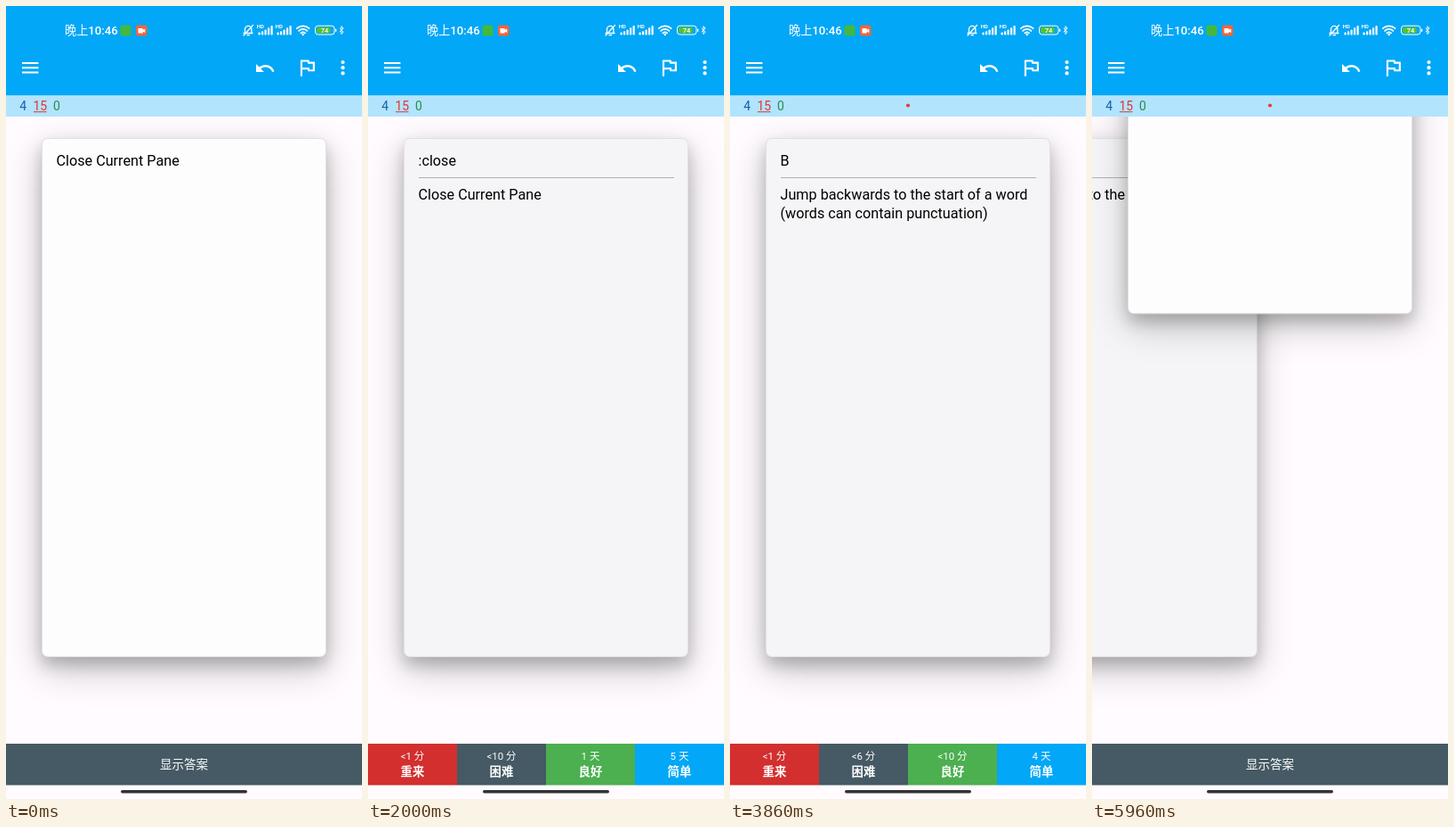
An HTML page for the animation above (6030 ms loop, 400 by 889 pixels).

```html
<!DOCTYPE html>
<html lang="zh-CN">
<head>
<meta charset="utf-8">
<title>Flashcards</title>
<style>
html, body { margin: 0; width: 100%; height: 100%; overflow: hidden; background: #fffbfe; }
#stage { position: absolute; left: 0; top: 0; width: 400px; height: 889px; overflow: hidden; background: #fffbfe; }
#deck { position: absolute; left: 0; top: 124px; width: 400px; height: 703px; overflow: hidden; }
.face {
  position: absolute; left: 40px; top: 24px; width: 320px; height: 582px;
  box-sizing: border-box; border: 1px solid #e1dfe2; border-radius: 7px;
  background: #fefdfe; box-shadow: 0 14px 42px rgba(0,0,0,.22), 0 9px 17px rgba(0,0,0,.2);
  font: 16.2px/20.5px Roboto, "Noto Sans", sans-serif; color: #000; visibility: hidden;
}
.back { background: #f5f4f6; }
.face p { position: absolute; margin: 0; left: 15.5px; top: 15.2px; white-space: pre; }
.back p + hr + p { top: 53.3px; }
.face hr { position: absolute; margin: 0; left: 16px; top: 43px; width: 287px; height: 1.4px; border: 0; background: #b2b1b3; }
svg { position: absolute; left: 0; top: 0; }
text { font-family: Roboto, "Noto Sans CJK SC", "Noto Sans CJK", sans-serif; }
</style>
</head>
<body>
<div id="stage">
  <div id="deck"></div>
  <svg width="400" height="889" viewBox="0 0 400 889">
    <rect width="400" height="100.5" fill="#02a7f7"/>
    <rect y="100.5" width="400" height="23.5" fill="#b2e4fd"/>

    <!-- status bar -->
    <text x="66" y="32" font-size="13.2" font-weight="500" fill="#fff">晚上10:46</text>
    <rect x="128.5" y="21.5" width="12" height="12" rx="2.5" fill="#43b93c"/>
    <rect x="146" y="21.5" width="12.500" height="12" rx="2.5" fill="#f2653a"/>
    <path d="M148.500 25h5.200v1.700l2.600-1.300v4.700l-2.600-1.300v1.700h-5.200z" fill="#fff"/>
    <g fill="none" stroke="#fff" stroke-width="1.3" stroke-linecap="round" stroke-linejoin="round">
      <path d="M267 30.500h10M268.500 30v-4a3.700 3.700 0 0 1 7.400 0v4M271 32.700h2.500M277.500 21.500l-10.500 11.500"/>
      <path d="M326.800 25.200a10 10 0 0 1 13.800 0M329 27.900a6.700 6.700 0 0 1 9.400 0M331.300 30.400a3.500 3.500 0 0 1 4.800 0" stroke-width="1.7"/>
      <path d="M375 25.200l4 4-2.100 2.300v-8.800l2.100 2.300-4 4" stroke-width="1"/>
    </g>
    <circle cx="333.700" cy="32" r="1.200" fill="#fff"/>
    <g id="signals" fill="#fff"></g>
    <rect x="347.500" y="22.200" width="21.500" height="9.800" rx="3" fill="none" stroke="#fff"/>
    <rect x="349" y="23.700" width="15.500" height="6.800" rx="1.700" fill="#55c232"/>
    <rect x="370" y="25.500" width="1.300" height="3.300" rx=".6" fill="#fff"/>
    <text x="358" y="29.900" font-size="7.500" font-weight="500" text-anchor="middle" fill="#fff">74</text>

    <!-- tool bar -->
    <path d="M18 64h18.500M18 69.200h18.500M18 74.400h18.500" stroke="#fff" stroke-width="2"/>
    <path transform="translate(279 58)" fill="#fff" d="M12.500 8c-2.650 0-5.050.99-6.900 2.600L2 7v9h9l-3.620-3.620c1.390-1.160 3.160-1.880 5.120-1.880 3.540 0 6.550 2.310 7.600 5.500l2.370-.78C21.080 11.030 17.150 8 12.500 8z"/>
    <path transform="translate(325.500 56.200) scale(1.07)" fill="#fff" d="M12.360 6l.4 2H18v6h-3.360l-.4-2H7V6h5.360M14 4H5v17h2v-7h5.600l.4 2h7V6h-5.600L14 4z"/>
    <g fill="#fff"><circle cx="378.500" cy="63" r="2.100"/><circle cx="378.500" cy="69.200" r="2.100"/><circle cx="378.500" cy="75.400" r="2.100"/></g>

    <!-- counts -->
    <g font-size="14">
      <text x="15.300" y="117" fill="#1260a8">4</text>
      <text x="30.500" y="117" fill="#e0362f">15</text>
      <text x="53" y="117" fill="#2c8c50">0</text>
    </g>
    <rect x="31" y="118.200" width="14.500" height="1" fill="#e0362f"/>
    <circle id="dot" cx="200" cy="111.500" r="2.100" fill="#f03a35"/>

    <!-- bottom -->
    <g id="show">
      <rect y="827" width="400" height="46.500" fill="#455a64"/>
      <text x="200" y="855" font-size="13.500" font-weight="500" text-anchor="middle" fill="#fff">显示答案</text>
    </g>
    <g id="grades" text-anchor="middle" fill="#fff"></g>
    <rect x="129" y="879" width="142" height="3.500" rx="1.750" fill="#333"/>
  </svg>
</div>
<script>
const LOOP = 6030, LAST = 5960, MOVE = 800, LEAD = 40;
const DEPTH = 1018, EXIT = 390, DROP = 695;
const $ = id => document.getElementById(id);

// enter, flip and exit are start times in ms
const cards = [
  { front: 'Close Current Pane', answer: ':close', enter: -MOVE, flip: 1200, exit: 2190,
    waits: ['<1 分', '<10 分', '1 天', '5 天'] },
  { front: 'Jump backwards to the start of a word\n(words can contain punctuation)', answer: 'B',
    enter: 2190, flip: 3057, exit: 3960, waits: ['<1 分', '<6 分', '<10 分', '4 天'] },
  { front: 'Jump forwards to the end of a word', answer: 'e',
    enter: 3960, flip: 4791, exit: 5746, waits: ['<1 分', '<6 分', '<10 分', '4 天'] },
  { front: '', answer: '', enter: 5746, flip: Infinity, exit: Infinity, waits: [] }
];
const grades = [['重来', '#d32f2f'], ['困难', '#455a64'], ['良好', '#4caf50'], ['简单', '#02a7f7']];

function face(kind, html) {
  const el = document.createElement('div');
  el.className = 'face ' + kind;
  el.innerHTML = html;
  $('deck').append(el);
  return el;
}
for (const c of cards) {
  c.backEl = face('back', `<p>${c.answer}</p><hr><p>${c.front}</p>`);
  c.frontEl = face('front', `<p>${c.front}</p>`);
}

$('grades').innerHTML = grades.map(([name, color], i) => `
  <rect x="${i * 100}" y="827" width="100" height="46.5" fill="${color}"/>
  <text class="wait" x="${i * 100 + 50}" y="845" font-size="11.5"></text>
  <text x="${i * 100 + 50}" y="863" font-size="13.4" font-weight="700">${name}</text>`).join('');
const waitEls = document.querySelectorAll('.wait');

let bars = '';
for (const x of [282, 303]) {
  bars += `<text x="${x - .3}" y="25.3" font-size="6" font-weight="700">HD</text>`;
  for (let i = 0; i < 5; i++) {
    const h = [3, 4.2, 6, 8.2, 10.5][i];
    bars += `<rect x="${x + 1.5 + i * 3.5}" y="${32.5 - h}" width="2.2" height="${h}" rx=".8"/>`;
  }
}
$('signals').innerHTML = bars;

// cubic-bezier(.25, .1, .25, 1)
function ease(x) {
  if (x <= 0) return 0;
  if (x >= 1) return 1;
  let lo = 0, hi = 1;
  for (let i = 0; i < 24; i++) {
    const s = (lo + hi) / 2;
    if (.75 * s * (1 - s) + s ** 3 < x) lo = s; else hi = s;
  }
  const r = 1 - lo;
  return .3 * r * r * lo + 3 * r * lo * lo + lo ** 3;
}
const since = (t, start) => ease((t - start) / MOVE);

function place(el, shown, x, y, angle) {
  el.style.visibility = shown ? 'visible' : 'hidden';
  if (!shown) return;
  const turn = angle ? ` perspective(${DEPTH}px) rotateY(${angle}deg)` : '';
  el.style.transform = `translate(${x}px, ${y}px)${turn}`;
}

function draw(t) {
  let graded = null;
  for (const c of cards) {
    const live = t >= c.enter && t < c.exit + MOVE;
    const x = -EXIT * since(t, c.exit);
    const y = -DROP * (1 - since(t, c.enter));
    const turn = 180 * since(t, c.flip);
    place(c.frontEl, live && turn < 90, x, y, -turn);
    place(c.backEl, live && turn >= 90, x, y, 180 - turn);
    if (t >= c.flip - LEAD && t < c.exit - LEAD) graded = c;
  }
  $('grades').style.display = graded ? '' : 'none';
  $('show').style.display = graded ? 'none' : '';
  if (graded) waitEls.forEach((el, i) => { el.textContent = graded.waits[i]; });
  $('dot').style.display = t >= cards[0].exit - LEAD ? '' : 'none';
}

const begin = performance.now();
function tick() {
  draw(Math.min((performance.now() - begin) % LOOP, LAST));
  requestAnimationFrame(tick);
}
tick();
</script>
</body>
</html>
```
